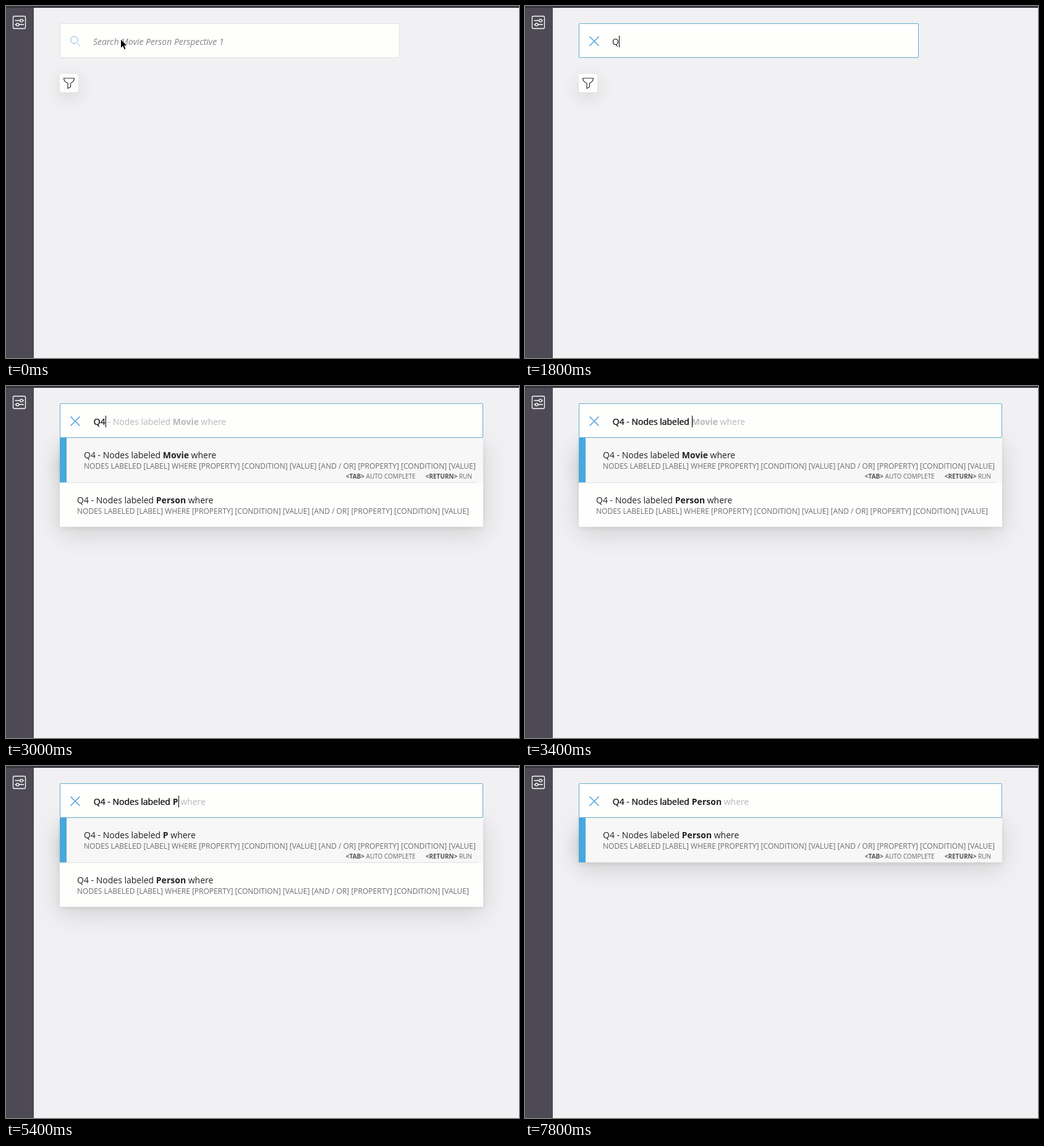
An HTML page that plays this animation: 830 by 570 pixels, repeating every 8 s.

```html
<!DOCTYPE html>
<html lang="en">
<head>
<meta charset="utf-8">
<title>Search suggestions</title>
<style>
  html, body { margin: 0; width: 100%; height: 100%; overflow: hidden; }
  body { position: relative; background: #f1f1f3; font: 14px/20px "Open Sans", sans-serif; color: #222; }
  body > *, .row > *, .bar { position: absolute; box-sizing: border-box; }
  svg { fill: none; overflow: visible; }
  .top { left: 0; top: 0; width: 100%; height: 3px; background: #37333c; }
  .side { left: 0; top: 3px; width: 45px; bottom: 0; background: #4d4a55; }
  .filter { left: 87px; top: 110px; width: 30px; height: 30px; border-radius: 4px; background: #fefefd;
            box-shadow: 0 8px 30px #0000001f, 0 1px 3px #0000000d; }
  #icons { left: 0; top: 0; }
  #list { left: 87px; top: 84px; overflow: hidden; background: #fefefd; box-shadow: 0 10px 40px #00000024, 0 2px 8px #00000014; }
  #box { left: 87px; top: 28px; height: 56px; border: 1px solid #e1e1e3; border-radius: 1px; background: #fefefd; }
  #box.focus { border-color: #66abcb; border-radius: 2px; }
  #field { left: 141px; top: 48px; white-space: pre; }
  #field.hint { left: 142px; }
  #field em { color: #858588; }
  .typed { text-shadow: -.5px 0 #222; }
  .ghost { color: #b9b9bb; }
  #caret { position: absolute; width: 1px; height: 19px; background: #000; }

  .row { position: absolute; left: 0; height: 73px; border: 0; white-space: pre; }
  .row::after { content: ""; position: absolute; left: 0; right: 10px; bottom: 0; height: 1px; background: #dfdfe2; }
  .row > * { left: 28px; }
  .row.active { background: #f7f7f7; }
  .row.active > * { left: 39px; }
  .row.active > .bar { left: 0; top: 0; width: 11px; height: 72px; background: #47a8de; }
  .title { top: 18px; }
  .sub { top: 36px; font-size: 12px; color: #6c6c6e; }
  .row:not(.active) > .title, .row:not(.active) > .sub { margin-top: 1px; }
  .row.active > .keys { left: auto; right: 18px; top: 52px; font-size: 10px; color: #66666a; }
  .keys b { color: #555; }
  .keys span { margin-left: 16px; }
  .pill { top: 25px; height: 23px; padding: 0 16px; border-radius: 12px; font-weight: bold; line-height: 23px; }
  .rel { top: 26px; display: flex; align-items: center; height: 21px; font-weight: bold; }
  .rel i { width: 21px; height: 21px; box-sizing: border-box; border: 1px solid #2f4a4c; border-radius: 50%; }
  .rel u { width: 17px; height: 2px; background: #2f4a4c; }
  .rel span { margin: 0 8px 0 7.5px; }
  .track { position: absolute; right: 0; top: 0; width: 10px; height: 100%; background: #d8d8d8; }
  .track::after { content: ""; position: absolute; width: 10px; height: 324px; border-radius: 5px; background: #a2a2a2; }
</style>
</head>
<body>
<div class="top"></div>
<div class="side"></div>
<div class="filter"></div>
<svg id="icons" width="830" height="570">
  <g stroke="#fff" stroke-width="1.3">
    <rect x="11.5" y="16.5" width="20" height="20" rx="2"/>
    <path d="M14.5 23.5h8M27.5 23.5h1.5M14.5 30h2M21 30h8"/>
    <circle cx="25" cy="23.5" r="2.2"/><circle cx="18.7" cy="30" r="2.2"/>
  </g>
  <path stroke="#333" stroke-width="1.2" stroke-linejoin="round"
        d="M93.5 117H110.5Q110.500 122 104.500 125V131L100 133.500V125Q93.500 122 93.500 117Z"/>
</svg>
<div id="list"></div>
<div id="box"></div>
<svg id="marks" style="left:0;top:0" width="830" height="570">
  <path id="lens" stroke="#79b5dc" d="M115.500 60.500L120 65.500M104.500 55a5.800 5.800 0 1 0 11.600 0a5.800 5.800 0 1 0 -11.600 0"/>
  <path id="cross" stroke="#5aa8dc" stroke-width="1.7" d="M104.500 49.500l15 15m0 -15l-15 15"/>
</svg>
<div id="field"></div>
<svg id="pointers" style="left:0;top:0" width="830" height="570">
  <path id="arrow" fill="#000" stroke="#fff" d="M185.500 53.500V68.500L189 65.300L191.300 70.700L194 69.500L191.700 64.300H196Z"/>
  <path id="beam" stroke="#000" stroke-width="1.2" d="M183 50.500Q186.500 50.500 186.500 53V61Q186.500 63.500 183 63.500M190 50.500Q186.500 50.500 186.500 53M186.500 61Q186.500 63.500 190 63.500M184.500 57.500h4"/>
</svg>

<script>
const LOOP = 8000;
const PREFIX = 'Q4 - Nodes labeled ';
const PATTERN = '[PROPERTY] [CONDITION] [VALUE]';
const KEYS = '<div class="keys"><b>&lt;TAB&gt;</b> AUTO COMPLETE<span><b>&lt;RETURN&gt;</b> RUN</span></div>';
const CARET = '<i id="caret"></i>';
const $ = id => document.getElementById(id);

const pill = (name, fill, ink) => `<div class="pill" style="background:${fill};color:${ink}">${name}</div>`;
const relation = name => `<div class="rel"><i></i><u></u><span>${name}</span><u></u><i></i></div>`;
const suggestion = label => `<div class="title">${PREFIX}<b>${label}</b> where</div>
  <div class="sub">NODES LABELED [LABEL] WHERE ${PATTERN} [AND / OR] ${PATTERN}</div>`;

const CATEGORIES = [
  pill('Movie', '#ffdf80', '#000'), pill('Person', '#c990bd', '#fff'),
  ...['ACTED_IN', 'DIRECTED', 'FOLLOWS', 'PRODUCED'].map(relation)
];

// Splits the suggested phrase at the caret: typed part dark, rest as a ghost.
function phrase(label, typedCount) {
  let left = typedCount;
  return [[PREFIX, 'span'], [label, 'b'], [' where', 'span']].map(([text, tag]) => {
    const cut = Math.max(0, left);
    const caret = left >= 0 && left < text.length ? CARET : '';
    left -= text.length;
    const shadow = tag === 'span' ? 'typed' : '';
    return `<${tag} class="${shadow}">${text.slice(0, cut)}</${tag}>${caret}` +
           `<${tag} class="ghost">${text.slice(cut)}</${tag}>`;
  }).join('');
}

const empty = (hint, pointer, rows = []) => ({
  field: (pointer === 'beam' ? CARET : '') + `<em>${hint}</em>`,
  focus: pointer === 'beam', pointer, rows, width: 550
});
const plain = text => ({ field: text + CARET, focus: true, cross: true, rows: [], width: 550 });
const query = (label, typedCount, labels) => ({
  field: phrase(label, typedCount), focus: true, cross: true, hint: true,
  rows: labels.map(suggestion), width: 685
});
const naming = label => query(label, PREFIX.length + label.length,
  label === 'Person' ? [label] : [label, 'Person']);

const PLACEHOLDER = 'Search Movie Person Perspective 1';
const TIMELINE = [
  [0, empty(PLACEHOLDER, 'arrow')],
  [200, empty(PLACEHOLDER, 'beam')],
  [400, empty('Movie', 'beam', CATEGORIES)],
  [1600, plain('Q')],
  [2200, plain('Q4')],
  [2800, query('Movie', 2, ['Movie', 'Person'])],
  [3200, query('Movie', PREFIX.length, ['Movie', 'Person'])],
  [5200, naming('P')],
  [5800, naming('Pe')],
  [6200, naming('Per')],
  [6400, naming('Pers')],
  [6600, naming('Perso')],
  [7000, naming('Person')]
];

const show = (id, on) => { $(id).style.display = on ? '' : 'none'; };

function draw(state) {
  const scrolls = state.rows.length > 2;
  const rowWidth = state.width - (scrolls ? 10 : 0);
  $('box').style.width = $('list').style.width = state.width + 'px';
  $('box').className = state.focus ? 'focus' : '';
  $('field').className = state.hint ? 'hint' : '';
  $('field').innerHTML = state.field;
  $('list').style.height = state.rows.length * 72 + 'px';
  $('list').innerHTML = state.rows.map((row, i) =>
    `<div class="row ${i ? '' : 'active'}" style="top:${i * 72}px;width:${rowWidth}px">` +
    (i ? '' : '<div class="bar"></div>') + row + (i ? '' : KEYS) + '</div>'
  ).join('') + (scrolls ? '<div class="track"></div>' : '');
  show('list', state.rows.length);
  show('lens', !state.cross);
  show('cross', state.cross);
  show('arrow', state.pointer === 'arrow');
  show('beam', state.pointer === 'beam');
}

let current;
function tick(now) {
  const t = now % LOOP;
  const [start, state] = TIMELINE.findLast(([at]) => at <= t);
  if (state !== current) draw(current = state);
  if ($('caret')) show('caret', (t - start) % 1000 < 500);
  requestAnimationFrame(tick);
}
tick(performance.now());
</script>
</body>
</html>
```
